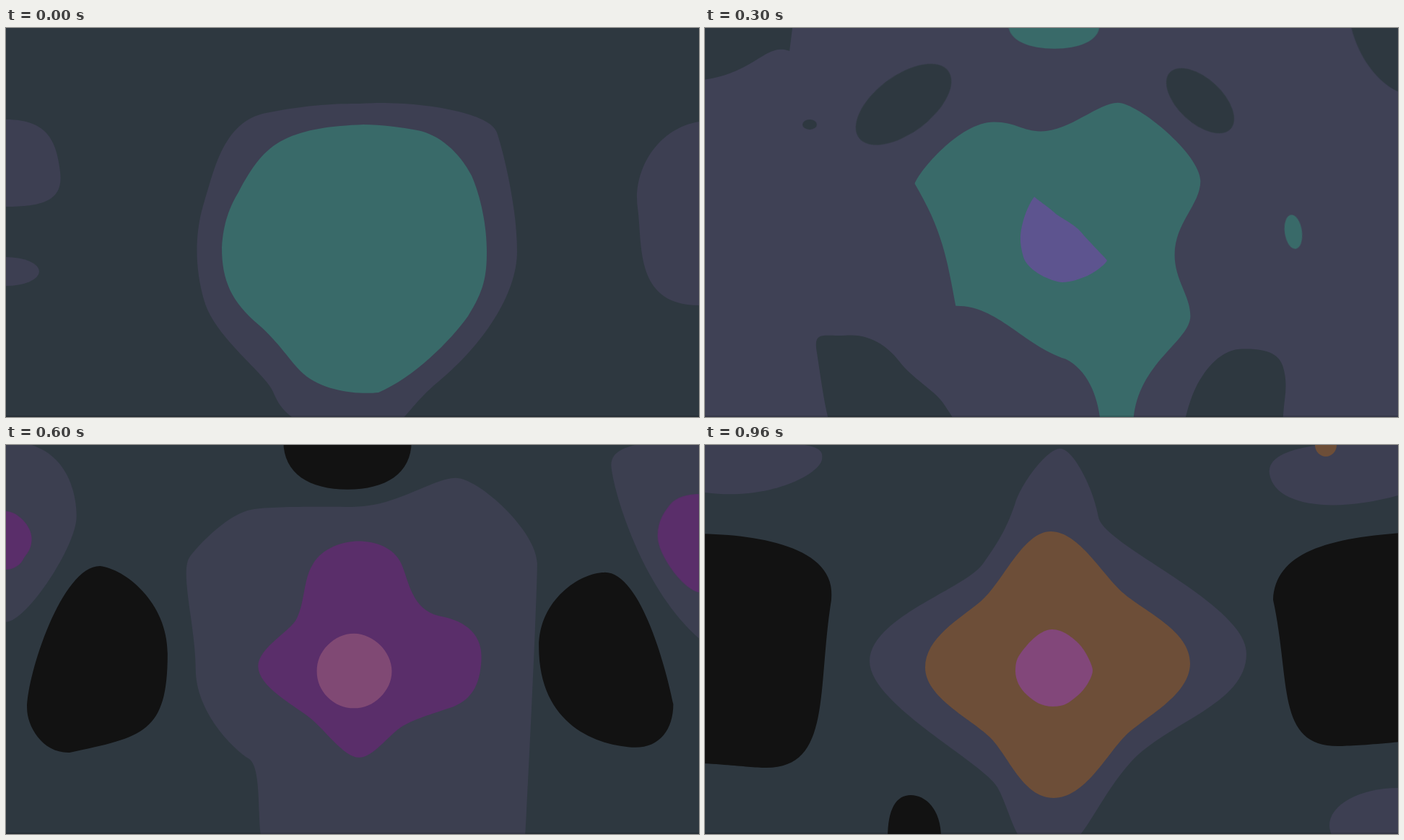
An HTML page without scripts that plays this animation: 960 by 540 pixels, repeating every 1 s.

```html
<!DOCTYPE html>
<html lang="en">
<head>
<meta charset="utf-8">
<title>Blob loop</title>
<style>
html, body { margin: 0; width: 100%; height: 100%; overflow: hidden; background: #2e3840; }
svg { display: block; width: 960px; height: 540px; }
svg * { animation: 1s linear infinite; }

.slate { fill: #2e3840; }
.haze { fill: #3d3f52; animation-name: haze-tone; }
.teal { fill: #396a69; }
.plum { fill: #5a2e6a; }
.indigo { fill: #5d548f; }
.violet { fill: #7858ae; }
.brown { fill: #6d4e38; }
.pink { fill: #82477a; }
.black { fill: #121212; }

/* Scale pulses, named after when they peak */
.p0 { animation-name: p0; }
.p1 { animation-name: p1; }
.p3 { animation-name: p3; }
.p5 { animation-name: p5; }
.p8 { animation-name: p8; }
.p9 { animation-name: p9; }
@keyframes p0 { 0%, 3% { transform: none } 10%, 100% { transform: scale(0) } }
@keyframes p1 { 0%, 3% { transform: scale(0) } 10% { transform: none } 24%, 100% { transform: scale(0) } }
@keyframes p3 { 0%, 13% { transform: scale(0) } 30% { transform: none } 43%, 100% { transform: scale(0) } }
@keyframes p5 { 0%, 40% { transform: scale(0) } 50% { transform: none } 60%, 100% { transform: scale(0) } }
@keyframes p8 { 0%, 68% { transform: scale(0) } 80% { transform: none } 88%, 100% { transform: scale(0) } }
@keyframes p9 { 0%, 82% { transform: scale(0) } 96%, 100% { transform: none } }
@keyframes grow { 0%, 40% { transform: scale(0) } 50%, 100% { transform: none } }
@keyframes side { 0%, 40% { transform: scale(0) } 50%, 60% { transform: none } 68%, 100% { transform: scale(0) } }

@keyframes haze-tone {
  0%, 96%, 100% { fill: #3d3f52 }
  10%, 30% { fill: #3f4155 }
  50% { fill: #3d4150 }
  60% { fill: #3c3f50 }
  80% { fill: #3a3d4d }
}

#cloud { animation-name: haze-tone, cloud; }
@keyframes cloud {
  0%, 3% { d: path("M490 105C560 100 670 115 680 145S708 250 708 310S660 440 600 490S560 560 480 560S380 530 370 505S290 430 275 380S262 280 275 240S300 130 360 118S460 105 490 105Z") }
  10% { d: path("M490 53C580 55 705 143 712 147S780 62 980 60S1010 500 1000 560S500 580 480 580S-20 580 -20 560S-40 88 -20 88S212 85 218 180S285 140 300 128S420 53 490 53Z") }
  30%, 50% { d: path("M480 -40C520 -40 780 -40 800 -40S1000 -40 1010 -40S1010 570 1010 580S490 580 480 580S-30 580 -40 580S-40 310 -40 300S-40 -30 -40 -40S190 -40 200 -40S470 -40 480 -40Z") }
  60% { d: path("M480 86C540 86 590 47 622 46S735 120 735 165S720 540 718 560S380 560 360 560S358 450 335 435S262 370 262 310S240 175 255 155S310 95 340 90S440 86 480 86Z") }
  80% { d: path("M490 69C550 69 580 -10 630 -15S850 70 900 80S740 180 732 250S810 420 785 460S640 480 625 550S440 470 400 470S225 190 208 150S300 25 350 18S440 69 490 69Z") }
  96%, 100% { d: path("M492 5C510 5 538 60 545 100S750 220 750 290S640 385 590 440S520 570 475 570S425 510 405 475S228 360 228 300S360 200 385 165S420 110 430 80S475 5 492 5Z") }
}

#hole-l { animation-name: hole-l, holes; }
#hole-r { animation-name: hole-r, holes; }
@keyframes holes { 0%, 3% { opacity: 0 } 10%, 60% { opacity: 1 } 60.1%, 100% { opacity: 0 } }
@keyframes hole-l {
  0%, 10% { d: path("M185 355C215 355 240 420 265 430S300 470 310 490S350 550 350 560S140 562 120 560S145 430 155 400S165 355 185 355Z") }
  30% { d: path("M195 428C230 425 255 445 270 465S320 505 330 520S352 550 350 560S190 560 180 560S160 480 155 450S165 430 195 428Z") }
  50% { d: path("M185 180C260 180 335 250 335 310S195 450 180 465S190 550 190 560S100 560 90 560S100 340 103 310S130 180 185 180Z") }
  60%, 100% { d: path("M120 150C200 150 248 250 248 310S240 450 230 465S190 550 190 560S100 560 90 560S10 340 20 310S60 150 120 150Z") }
}
@keyframes hole-r {
  0%, 10% { d: path("M775 352C790 350 785 380 785 400S795 450 800 470S835 550 835 560S760 562 745 560S715 490 712 470S755 356 775 352Z") }
  30% { d: path("M740 447C780 445 795 455 800 470S805 500 803 515S800 550 800 560S670 560 665 560S670 520 680 500S710 450 740 447Z") }
  50% { d: path("M780 190C830 190 860 240 860 290S855 370 850 395S830 422 810 422S720 400 690 370S665 320 667 290S710 190 780 190Z") }
  60%, 100% { d: path("M830 150C900 150 940 220 940 290S950 410 930 440S860 470 830 470S760 430 745 400S738 320 740 290S770 150 830 150Z") }
}

#edge-l { animation-name: haze-tone, edge-l; }
#edge-r { animation-name: haze-tone, edge-r; }
@keyframes edge-l {
  0%, 3% { d: path("M0 127C60 127 70 160 75 200S50 248 0 248Z") }
  10%, 50%, 80% { d: path("M0 -40C0 -40 30 -30 30 -20S0 -10 0 -10Z") }
  60% { d: path("M0 -5C80 -5 98 60 98 100S30 245 0 247Z") }
  96%, 100% { d: path("M0 -5C150 -5 165 0 162 20S90 78 0 66Z") }
}
@keyframes edge-r {
  0%, 3% { d: path("M960 130C900 140 868 200 875 250S870 385 960 385Z") }
  10%, 50%, 80% { d: path("M960 -40C960 -40 930 -30 930 -20S960 -10 960 -10Z") }
  60% { d: path("M960 -5C900 -5 835 -5 838 30S880 200 960 270Z") }
  96%, 100% { d: path("M960 -5C900 -5 775 -5 782 40S870 95 960 70Z") }
}

#body { animation-name: body, body-tone; }
@keyframes body-tone { 0%, 40% { fill: #396a69 } 40.1%, 100% { fill: #5a2e6a } }
@keyframes body {
  0%, 3% { d: path("M495 134C520 134 548 138 570 142C600 148 628 172 645 205C658 235 666 275 666 310C666 345 662 365 640 400C615 435 565 485 516 506C490 509 440 505 412 480C395 465 378 436 350 412C312 380 299 350 299 305C301 270 310 248 322 228C340 193 358 168 385 155C415 140 450 136 495 134Z") }
  10% { d: path("M532 131C540 134 562 130 568 136C584 160 565 216 600 215C620 214 635 207 652 211C658 218 668 250 660 262C650 280 615 325 587 346C583 335 560 340 543 340C530 355 510 367 490 367C435 368 405 315 427 272C424 262 418 236 415 228C425 212 450 185 443 166C485 168 500 140 532 131Z") }
  30% { d: path("M465 143C505 143 545 103 572 103C600 103 687 175 687 212C687 245 651 270 651 315C651 350 673 372 673 400C673 435 600 465 594 545C580 545 560 545 548 545C544 510 530 475 500 460C440 440 405 385 347 386C335 320 328 280 290 216C295 200 352 130 400 130C430 130 440 143 465 143Z") }
  50%, 80%, 100% { d: path("M485 227C501 227 517 232 531 241C545 250 555 262 562 277C569 292 571 308 569 324C567 340 560 356 549 368C538 380 525 389 509 394C493 399 477 398 461 394C445 390 432 380 421 368C410 356 403 340 401 324C399 308 401 292 408 277C415 262 425 249 439 241C453 233 469 227 485 227Z") }
  60% { d: path("M488 133C512 133 538 142 548 165C558 188 562 228 600 237C640 244 661 265 659 298C657 334 645 355 615 365C585 375 568 380 550 390C530 402 510 434 489 434C468 434 440 393 420 378C398 361 349 335 349 307C349 281 395 258 403 240C414 218 412 185 425 165C438 142 468 133 488 133Z") }
}

#core { transform-origin: 484px 300px; animation-name: core, core-tone, core-grow; }
@keyframes core-grow { 0%, 15% { transform: scale(0) } 30%, 100% { transform: none } }
@keyframes core-tone { 0%, 50% { fill: #5d548f } 60% { fill: #804974 } 75%, 100% { fill: #6d4e38 } }
@keyframes core {
  0%, 30% { d: path("M456 234C460 238 478 250 484 256S512 272 521 283S555 319 557 322S540 340 530 344S508 353 495 353S447 338 441 318S436 285 440 270S450 242 456 234Z") }
  50% { d: path("M483 297C488 297 493 299 496 302S501 310 501 315S499 325 496 328S488 333 483 333S473 331 470 328S465 320 465 315S467 305 470 302S478 297 483 297Z") }
  60% { d: path("M482 262C496 262 509 269 518 278S534 300 534 314S528 340 518 350S496 365 482 365S456 360 446 350S431 328 431 314S436 288 446 278S468 262 482 262Z") }
  80% { d: path("M482 189C517 189 553 198 577 224S618 275 618 309S600 378 578 398S520 439 485 439S420 417 398 400S351 345 351 309S368 249 390 225S447 189 482 189Z") }
  96%, 100% { d: path("M479 120C518 120 550 180 580 206S672 258 672 303S608 378 582 404S526 490 483 490S420 430 394 405S305 350 305 309S352 242 382 217S440 120 479 120Z") }
}
#rim, #seed { transform-origin: 484px 312px; }
#rim { animation-name: rim; }
@keyframes rim {
  0%, 71% { transform: scale(.7); visibility: hidden }
  71.1% { transform: scale(.7); visibility: visible }
  80%, 85% { transform: none; visibility: visible }
  85.1%, 100% { transform: none; visibility: hidden }
}

#black-l { transform-origin: 183px 302px; animation-name: black-l, grow; }
#black-r { transform-origin: 775px 300px; animation-name: black-r, grow; }
#black-t { transform-origin: 478px 0; animation-name: black-t, grow; }
@keyframes black-l {
  0%, 50% { d: path("M183 227C215 227 237 262 237 300C237 345 208 378 167 378C138 378 129 352 129 325C130 275 150 227 183 227Z") }
  60% { d: path("M131 168C165 172 224 218 224 290C224 400 190 405 88 427C50 428 30 390 30 365C30 320 78 168 131 168Z") }
  80% { d: path("M-20 150C60 160 192 175 192 270C192 365 180 409 105 409C60 409 -150 405 -150 400C-150 200 -100 145 -20 150Z") }
  96%, 100% { d: path("M-20 123C70 123 184 140 175 215C155 340 176 448 85 448C50 448 20 438 -150 440C-150 300 -100 123 -20 123Z") }
}
@keyframes black-r {
  0%, 50% { d: path("M775 233C808 233 823 295 823 325C823 355 812 369 787 369C750 369 727 335 727 296C727 255 745 233 775 233Z") }
  60% { d: path("M828 177C880 176 915 320 923 360C923 395 905 420 872 420C820 418 738 390 738 280C738 215 795 177 828 177Z") }
  80% { d: path("M980 153C1050 155 1200 200 1200 300C1200 350 1000 382 860 384C790 384 770 340 770 265C772 180 870 175 980 153Z") }
  96%, 100% { d: path("M980 121C1050 121 1200 200 1200 300C1200 400 940 416 880 418C790 420 812 330 787 215C790 150 860 128 980 121Z") }
}
@keyframes black-t {
  0%, 50% { d: path("M405 -10C402 40 430 76 478 76C526 76 552 40 549 -10Z") }
  60% { d: path("M384 -5C384 40 420 62 473 62C526 62 562 40 562 -5Z") }
  80% { d: path("M449 -5C449 4 460 9 476 9C492 9 503 4 503 -5Z") }
  84%, 100% { d: path("M455 -9C455 -5 465 -2 476 -2C488 -2 497 -5 497 -9Z") }
}

.l, .r { animation-name: side; }
.l { transform-origin: 0 240px; }
.r { transform-origin: 960px 240px; }
.l.p5, .r.p5 { animation-name: p5; }
#plum-l { animation-name: side, plum-l; }
#plum-r { animation-name: side, plum-r; }
@keyframes plum-l {
  0%, 50% { d: path("M0 60C90 58 136 95 136 135S80 275 72 320S75 462 0 462Z") }
  60%, 100% { d: path("M0 90C15 90 36 110 36 128S28 150 24 158S10 172 0 172Z") }
}
@keyframes plum-r {
  0%, 50% { d: path("M960 50C930 44 880 43 850 45S806 95 806 130S868 240 877 320S870 482 960 485Z") }
  60%, 100% { d: path("M960 66C950 66 930 68 920 80S902 105 902 125S920 170 928 180S950 203 960 204Z") }
}
</style>
</head>
<body>
<svg viewBox="0 0 960 540">
  <rect class="slate" width="960" height="540"/>
  <path id="cloud" class="haze"/>

  <g class="slate">
    <path id="hole-l"/>
    <path id="hole-r"/>
    <g class="p1" style="transform-origin:0 540px"><ellipse cx="0" cy="545" rx="72" ry="90"/></g>
    <g class="p1" style="transform-origin:960px 540px"><ellipse cx="960" cy="545" rx="62" ry="58"/></g>
    <g class="p3" style="transform-origin:0 0"><path d="M0 0H122L118 32C85 20 70 62 0 72Z"/></g>
    <g class="p3" style="transform-origin:960px 0"><path d="M895 0H960V89C930 75 905 40 895 0Z"/></g>
    <g class="p3" style="transform-origin:275px 105px"><ellipse cx="275" cy="106" rx="78" ry="40" transform="rotate(-37 275 106)"/></g>
    <g class="p3" style="transform-origin:685px 100px"><ellipse cx="686" cy="101" rx="58" ry="31" transform="rotate(43 686 101)"/></g>
    <g class="p3" style="transform-origin:145px 134px"><ellipse cx="145" cy="134" rx="10" ry="7"/></g>
    <g class="p5" style="transform-origin:478px 0"><path d="M360 -5C355 50 390 70 390 120S388 160 400 160S415 145 430 140S465 150 490 150S545 125 565 85S595 30 598 -5Z"/></g>
    <g class="p5" style="transform-origin:470px 540px"><path d="M402 545V490Q402 466 440 465T520 480Q540 482 538 500V545Z"/></g>
  </g>

  <path id="edge-l" class="haze"/>
  <path id="edge-r" class="haze"/>
  <g class="p0" style="transform-origin:0 340px"><ellipse class="haze" cx="0" cy="338" rx="46" ry="20"/></g>
  <g class="p9" style="transform-origin:960px 540px"><ellipse class="haze" cx="960" cy="528" rx="95" ry="52"/></g>

  <path id="body"/>
  <g class="teal">
    <g class="p1" style="transform-origin:514px 540px"><path d="M485 540C485 525 500 517 525 519L523 512L537 517Q544 525 541 540Z"/></g>
    <g class="p3" style="transform-origin:483px 0"><path d="M420 -4C420 18 450 29 484 29S547 18 547 -4Z"/></g>
    <g class="p3" style="transform-origin:815px 283px"><ellipse cx="815" cy="283" rx="12" ry="24" transform="rotate(-8 815 283)"/></g>
  </g>

  <path id="core"/>
  <path id="rim" class="plum" d="M371 271C373 240 380 215 400 202S480 176 530 175S610 205 616 250S612 385 536 409C590 375 606 340 606 305S588 232 568 215S520 189 480 189S398 215 371 271Z"/>
  <path id="seed" class="pink p9" d="M481 256C496 256 510 268 518 276S537 305 537 313S528 338 516 348S498 363 482 363S456 356 446 347S430 326 430 314S432 296 438 288S462 256 481 256Z"/>
  <g class="plum">
    <path class="p8" style="transform-origin:610px 92px" d="M611 77L621 105Q614 106 604 101Q596 96 598 88Q603 78 611 77Z"/>
    <circle class="p8" style="transform-origin:694px 165px" cx="694" cy="165" r="6.5"/>
  </g>

  <path id="plum-l" class="plum l"/>
  <path id="plum-r" class="plum r"/>
  <g class="indigo">
    <path class="l p5" d="M0 107C50 105 84 120 84 155S50 285 0 288Z"/>
    <ellipse class="l p5" cx="0" cy="351" rx="15" ry="34"/>
    <path class="r p5" d="M960 81C920 78 843 85 843 145S890 260 900 330S905 430 960 438Z"/>
  </g>
  <path class="violet r p5" d="M960 118C930 120 885 130 885 160S925 258 960 263Z"/>

  <g class="black">
    <path id="black-l"/>
    <path id="black-r"/>
    <path id="black-t"/>
    <path class="p9" style="transform-origin:290px 540px" d="M253 545C253 505 265 486 285 486S327 505 327 545Z"/>
  </g>
  <ellipse class="brown p9" style="transform-origin:860px 0" cx="860" cy="0" rx="15" ry="16"/>
  <rect y="538" width="960" height="2" opacity=".15"/>
</svg>
</body>
</html>
```
